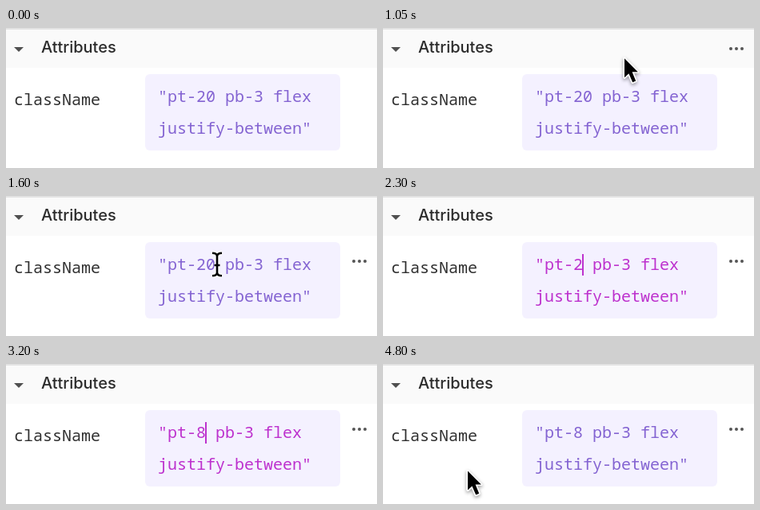
Recreate the animation shown at these times as an HTML page with a canvas. Size 464x176 px, loop 6200 ms.

```html
<!DOCTYPE html>
<html lang="en">
<head>
<meta charset="utf-8">
<title>Editing a class name</title>
<style>
  html, body { margin: 0; width: 100%; height: 100%; overflow: hidden; background: #fff; }
  canvas { display: block; width: 464px; height: 176px; }
</style>
</head>
<body>
<canvas id="stage" width="464" height="176"></canvas>
<script>
const ctx = document.getElementById('stage').getContext('2d');
const LOOP = 6200, STEP = 50;
const ENTER = 750, HOOK = 1350, FOCUS = 2250, ERASED = 2400, TYPED = 3200, LEAVE = 3900, BLUR = 4600;
const BLINK = 670;
const MONO = '20px "Noto Sans Mono", "DejaVu Sans Mono", monospace';
const TITLE = '500 20px Inter, Roboto, sans-serif';
const PURPLE = '#8464d2', MAGENTA = '#bd32ce';
const BLOCK = { x: 174, y: 58, w: 244, h: 96 };
const CODE_X = 190, CHAR_W = 12;

const point = (x, y) => ({ x, y });

// Position on a quadratic curve a-b-c that starts at `from` and lasts `span`
function glide(t, from, span, a, b, c) {
  const k = Math.min(1, (t - from) / span);
  const mix = axis => (1 - k) ** 2 * a[axis] + 2 * k * (1 - k) * b[axis] + k * k * c[axis];
  return point(mix('x'), mix('y'));
}

function cursorAt(t) {
  const turn = point(236, 107);
  if (t >= LEAVE) return glide(t, LEAVE, 300, point(254, 93), point(239, 111), point(106, 133));
  if (t < ENTER || t >= FOCUS) return null;
  if (t < HOOK) return glide(t, ENTER, HOOK - ENTER, point(346, -24), point(313, 32), turn);
  return glide(t, HOOK, 250, turn, point(327, 39), point(264, 86));
}

function valueAt(t) {
  if (t >= TYPED) return '8';
  return '20'.slice(0, t < FOCUS ? 2 : t < ERASED ? 1 : 0);
}

// Typing restarts the blink
function caretLit(t) {
  const phase = t - (t < TYPED ? FOCUS - STEP : TYPED);
  return phase % BLINK < BLINK / 2;
}

function text(str, x, y, font, color) {
  ctx.font = font;
  ctx.fillStyle = color;
  ctx.fillText(str, x, y);
}

function rect(x, y, w, h, color, radius = 0) {
  ctx.fillStyle = color;
  ctx.beginPath();
  ctx.roundRect(x, y, w, h, radius);
  ctx.fill();
}

function polygon(points) {
  ctx.beginPath();
  points.forEach(([x, y]) => ctx.lineTo(x, y));
  ctx.closePath();
}

function drawPanel() {
  rect(0, 0, 464, 176, '#fff');
  rect(0, 0, 464, 50, '#fafafa');
  rect(0, 0, 464, 2, '#e3e3e3');
  polygon([[10, 24], [22, 24], [16, 30]]);
  ctx.fillStyle = '#505050';
  ctx.fill();
  text('Attributes', 44, 31, TITLE, '#2c2c2c');
  text('className', 10, 97, MONO, '#303030');
  rect(BLOCK.x, BLOCK.y, BLOCK.w, BLOCK.h, '#f4f1ff', 6);
}

function drawCode(t) {
  const focused = t >= FOCUS && t < BLUR;
  const color = focused ? MAGENTA : PURPLE;
  const head = '"pt-' + valueAt(t);
  text(head + ' pb-3 flex', CODE_X, 93, MONO, color);
  text('justify-between"', CODE_X, 133, MONO, color);
  if (focused && caretLit(t)) rect(CODE_X + head.length * CHAR_W - 1, 73, 2, 27, color);
}

function drawDots(y) {
  for (let i = 0; i < 3; i++) rect(433 + 7 * i, y - 2, 4, 4, '#555', 2);
}

function drawArrow() {
  polygon([[0, 1.5], [0, 25.5], [5.4, 20.4], [10.2, 31.5], [14.2, 29.8], [9.6, 18.4], [16.8, 18.4]]);
  ctx.lineJoin = 'round';
  ctx.lineWidth = 3.4;
  ctx.strokeStyle = '#fff';
  ctx.shadowColor = 'rgba(0,0,0,.4)';
  ctx.shadowBlur = 4;
  ctx.shadowOffsetY = 2;
  ctx.stroke();
  ctx.shadowColor = 'transparent';
  ctx.fillStyle = '#000';
  ctx.fill();
}

function drawBeam() {
  ctx.beginPath();
  for (const s of [-1, 1]) {
    ctx.moveTo(-6, s * 14.3);
    ctx.quadraticCurveTo(0, s * 14.3, 0, s * 10);
    ctx.quadraticCurveTo(0, s * 14.3, 6, s * 14.3);
  }
  ctx.moveTo(0, -11);
  ctx.lineTo(0, 11);
  ctx.moveTo(-3.5, 1);
  ctx.lineTo(3.5, 1);
  ctx.lineJoin = 'round';
  for (const [width, color] of [[5, '#fff'], [2.6, '#000']]) {
    ctx.lineWidth = width;
    ctx.strokeStyle = color;
    ctx.stroke();
  }
}

function drawCursor({ x, y }) {
  const overCode = x > BLOCK.x && x < BLOCK.x + BLOCK.w && y > BLOCK.y && y < BLOCK.y + BLOCK.h;
  ctx.save();
  ctx.translate(x, y);
  overCode ? drawBeam() : drawArrow();
  ctx.restore();
}

function draw(t) {
  const cursor = cursorAt(t);
  drawPanel();
  drawCode(t);
  if (t >= ENTER) drawDots(cursor && cursor.y < 50 ? 26 : 82);
  if (cursor) drawCursor(cursor);
}

const start = performance.now();
function frame() {
  const t = (performance.now() - start) % LOOP;
  draw(Math.floor(t / STEP) * STEP);
  requestAnimationFrame(frame);
}
frame();
</script>
</body>
</html>
```
